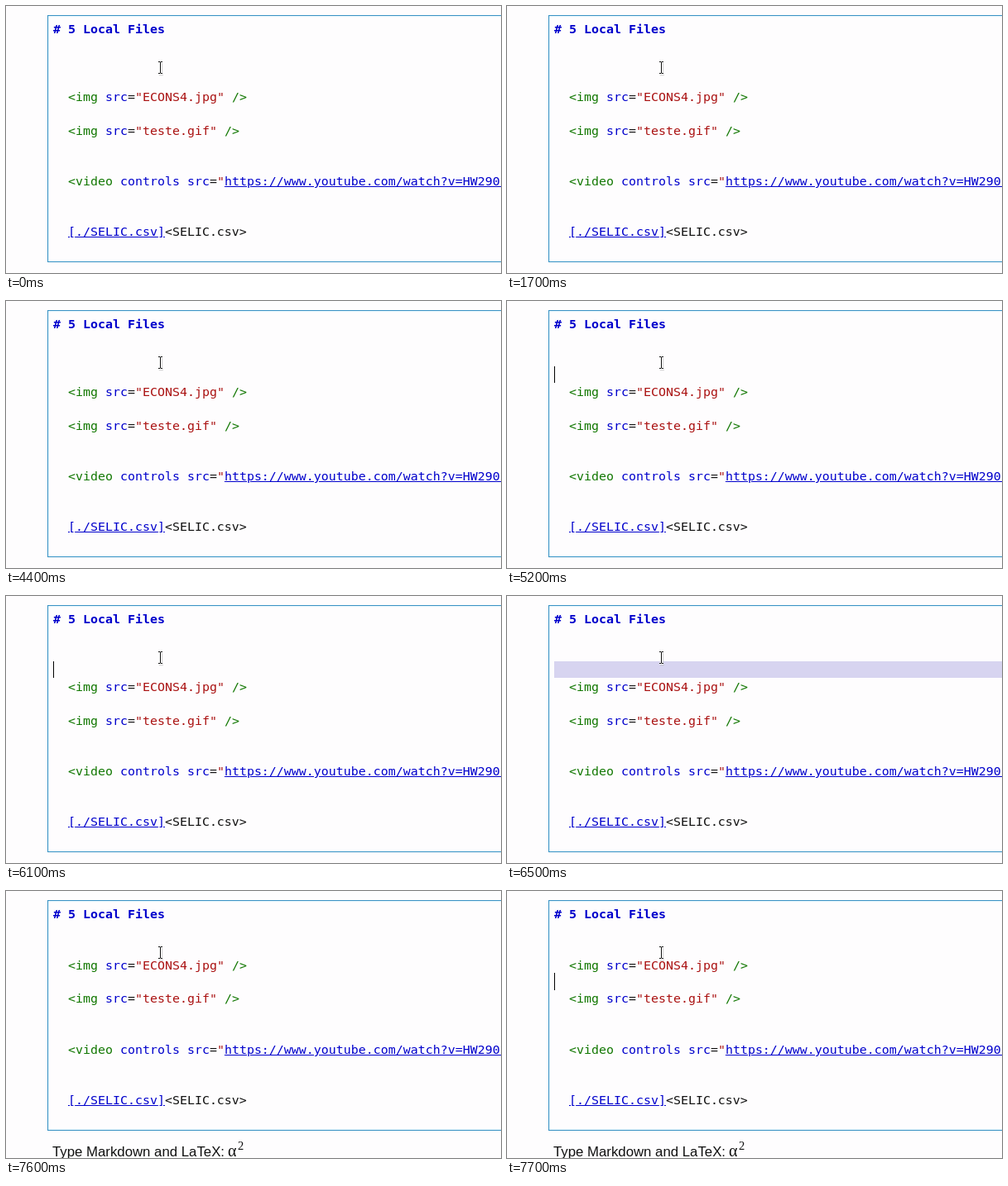
Recreate the animation shown at these times as an HTML page. Size 598 by 323 pixels, loop 8 s.

```html
<!DOCTYPE html>
<html lang="en">
<head>
<meta charset="utf-8">
<title>Markdown cell</title>
<style>
html, body { margin: 0; width: 100%; height: 100%; overflow: hidden; background: #fefdfe; }
#stage { position: relative; width: 598px; height: 323px; overflow: hidden; }
#stage > *, .line { position: absolute; white-space: pre; }
#cell {
  left: 50px; top: 11px; width: 600px; box-sizing: border-box;
  border: 1px solid #3b93c4; box-shadow: inset 0 0 2px #9fe0f5;
}
#select { left: 57px; width: 541px; background: #d7d4f0; }
#caret { width: 1px; background: #000; }
.line { font: 14.95px/20px "DejaVu Sans Mono", monospace; color: #111; }
.line b { color: #00c; }
.line i { font-style: normal; color: #170; }
.line em { font-style: normal; color: #00c; }
.line s { text-decoration: none; color: #a11; }
.line u { color: #00c; }
#hint { left: 56px; top: 306px; font: 16.8px/19px "Liberation Sans", Arial, sans-serif; color: #111; }
.math { font-family: "Liberation Serif", serif; line-height: 20px; color: #111; }
</style>
</head>
<body>
<div id="stage">
  <div id="cell"></div>
  <div id="select"></div>
  <div id="code"></div>
  <div id="caret"></div>
  <div id="foot">
    <div id="hint" class="line">Type Markdown and LaTeX:</div>
    <div class="line math" style="left:268px;top:304px;font-size:20px">α</div>
    <div class="line math" style="left:280px;top:298px;font-size:14.5px">2</div>
  </div>
  <svg style="left:180px;top:64px" width="14" height="22" fill="none">
    <path d="M5 5H9M8.5 5V18M5 19.5H10" stroke="#bbb" stroke-width="1.5" opacity=".55"/>
    <path d="M4 3.5H6L6.5 4L7 3.5H9M6.5 4V17M4 17.5H6L6.5 17L7 17.5H9" stroke="#fff" stroke-width="2.4"/>
    <path d="M4 3.5H6L6.5 4L7 3.5H9M6.5 4V17M4 17.5H6L6.5 17L7 17.5H9" stroke="#111"/>
  </svg>
</div>
<script>
const LOOP = 8000, PITCH = 20.4, TOP = 17.6, CUT = 7100;
const $ = id => document.getElementById(id);

// line number, markup
const lines = [
  [0, '<b># 5 Local Files</b>'],
  [4, '  <i>&lt;img</i> <em>src</em>=<s>"ECONS4.jpg"</s> <i>/&gt;</i>'],
  [6, '  <i>&lt;img</i> <em>src</em>=<s>"teste.gif"</s> <i>/&gt;</i>'],
  [9, '  <i>&lt;video</i> <em>controls</em> <em>src</em>=<s>"</s><u>https://www.youtube.com/watch?v=HW290&nbsp;</u>'],
  [12, '  <u>[./SELIC.csv]</u>&lt;SELIC.csv&gt;']
].map(([row, html]) => {
  const el = document.createElement('div');
  el.className = 'line';
  el.style.left = '57px';
  el.innerHTML = html;
  $('code').append(el);
  return { row, el };
});

// time, caret line (-1 hides it), caret x
const caretSteps = [
  [0, -1], [1100, 7, 75], [1200, 2], [1700, -1], [2200, 2], [2700, -1],
  [3000, 3], [4400, -1], [4700, 3], [5000, -1], [5200, 3], [5700, 4],
  [6100, 3], [6500, -1], [7100, 3], [7600, -1], [7700, 4]
];

const edge = row => Math.round(TOP + row * PITCH);

function span(el, row) {
  el.style.top = edge(row) + 'px';
  el.style.height = edge(row + 1) - edge(row) + 'px';
}

function show(el, on) {
  el.style.visibility = on ? 'visible' : 'hidden';
}

function draw(t) {
  const cut = t >= CUT;
  for (const { row, el } of lines) {
    const n = cut && row > 3 ? row - 1 : row;
    el.style.top = Math.ceil(18 + n * PITCH - 0.01) + 'px';
  }
  $('cell').style.height = (cut ? 279 : 299) + 'px';
  show($('foot'), cut);
  show($('select'), t >= 6500 && !cut);

  const [, row, x = 57] = caretSteps.findLast(step => step[0] <= t);
  show($('caret'), row >= 0);
  if (row >= 0) {
    $('caret').style.left = x + 'px';
    span($('caret'), row);
  }
}

span($('select'), 3);
const start = performance.now();
function tick() {
  draw((performance.now() - start) % LOOP);
  requestAnimationFrame(tick);
}
tick();
</script>
</body>
</html>
```
